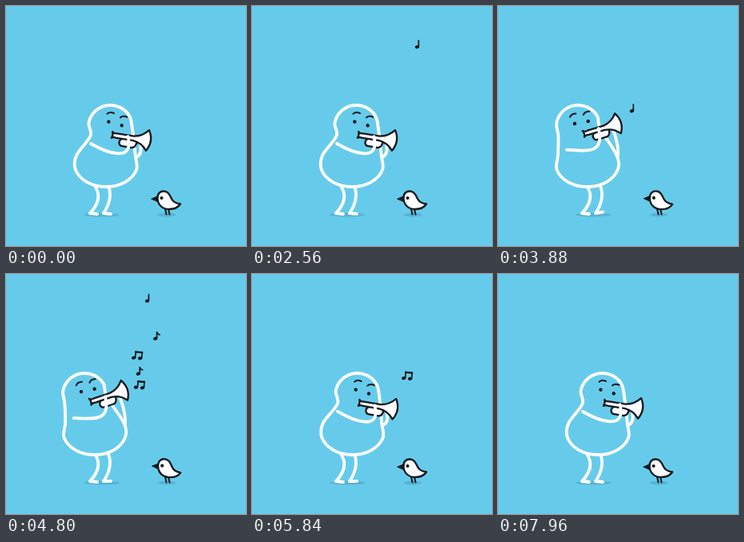
An HTML page with a canvas for the animation above (8 s loop, 300 by 300 pixels).

```html
<!DOCTYPE html>
<html lang="en">
<head>
<meta charset="utf-8">
<title>Trumpet player and bird</title>
<style>
  html, body { margin: 0; width: 100%; height: 100%; overflow: hidden; background: #66cbeb; }
  canvas { display: block; width: 300px; height: 300px; }
</style>
</head>
<body>
<canvas id="stage"></canvas>
<script>
const LOOP = 8000, SKY = '#66cbeb', SHADE = '#58b3d3', INK = '#16181c', WHITE = '#fff';
const RAD = Math.PI / 180;
const canvas = document.getElementById('stage');
const ctx = canvas.getContext('2d');
const ratio = window.devicePixelRatio || 1;
canvas.width = canvas.height = 300 * ratio;

const phrases = [
  { start: 1600, end: 2720, count: 1, first: 0, x: 190, y: 150, drift: 18, spread: 0 },
  { start: 3760, end: 5400, count: 5, first: 0, x: 167, y: 141, drift: 10, spread: 26 },
  { start: 5630, end: 6260, count: 1, first: 2, x: 191, y: 150, drift: 18, spread: 0 }
];

const mix = (a, b, u) => a + (b - a) * u;
const wave = (t, period) => Math.sin(Math.PI * t / period) ** 2;
const hump = (t, from, to) => t > from && t < to ? wave(t - from, to - from) : 0;

function ramp(t, from, to) {
  const u = Math.min(1, Math.max(0, (t - from) / (to - from)));
  return u * u * (3 - 2 * u);
}

// 0 is upright, 1 is leaning back.
function leanAt(t) {
  return .96 * ramp(t, 3480, 3880) + .06 * ramp(t, 3880, 4800)
    - 1.06 * ramp(t, 4900, 5400) + .04 * ramp(t, 5900, 6280) - .06 * hump(t, 2960, 3560);
}

function stroke(path, color, width) {
  ctx.strokeStyle = color;
  ctx.lineWidth = width;
  ctx.stroke(path);
}

function curve(color, width, x, y, ...rest) {
  const path = new Path2D();
  path.moveTo(x, y);
  if (rest.length === 2) path.lineTo(...rest);
  else if (rest.length === 4) path.quadraticCurveTo(...rest);
  else path.bezierCurveTo(...rest);
  stroke(path, color, width);
}

function oval(x, y, rx, ry, color, turn = 0) {
  ctx.beginPath();
  ctx.ellipse(x, y, rx, ry, turn, 0, Math.PI * 2);
  ctx.fillStyle = color;
  ctx.fill();
}

function at(x, y, degrees, draw) {
  ctx.save();
  ctx.translate(x, y);
  ctx.rotate(degrees * RAD);
  draw();
  ctx.restore();
}

// Moves a point out of a turned frame { x, y, turn }.
function place(frame, x, y) {
  const c = Math.cos(frame.turn * RAD), s = Math.sin(frame.turn * RAD);
  return [frame.x + x * c - y * s, frame.y + x * s + y * c];
}

function outlined(path, width) {
  ctx.fillStyle = WHITE;
  ctx.fill(path);
  stroke(path, INK, width);
}

function arc(cx, cy, rx, ry, from, to, steps) {
  return Array.from({ length: steps + 1 }, (_, i) => {
    const a = mix(from, to, i / steps) * RAD;
    return [cx + rx * Math.cos(a), cy + ry * Math.sin(a)];
  });
}

// Smooth closed curve through the points.
function blob(points) {
  const path = new Path2D(), n = points.length;
  path.moveTo(...points[0]);
  points.forEach((p, i) => {
    const before = points[(i + n - 1) % n], next = points[(i + 1) % n], after = points[(i + 2) % n];
    path.bezierCurveTo(
      p[0] + (next[0] - before[0]) / 6, p[1] + (next[1] - before[1]) / 6,
      next[0] - (after[0] - p[0]) / 6, next[1] - (after[1] - p[1]) / 6, ...next);
  });
  return path;
}

const hornLoop = new Path2D('M13 3 Q9 6 11 10 Q12 12 15 12 H27 Q32 11 32 4');
const hornTube = new Path2D('M0 -4 Q2 -1.5 6 -2.5 H27 Q38 -4 45 -13 Q53 0 45 13 Q38 4 27 3 H6 Q2 2 0 4 Q2 0 0 -4 Z');
const birdBody = new Path2D('M189.5 241 C189 234 193 231.5 197 231.5 C203 231.5 205 237 207 241 C209 245 213 247 218 247.5 C215 252 210 254 204 254 C196 254 190 249 189.5 241 Z');
const birdBeak = new Path2D('M182 241 L189 238 V244 Z');

function drawHorn(horn) {
  at(horn.x, horn.y, horn.turn, () => {
    outlined(hornLoop, 2.3);
    outlined(hornTube, 2.3);
  });
}

function drawLeg(hip, bow, heel, lift) {
  curve(WHITE, 3.8, hip, 225, hip + bow, 241, heel, 259);
  at(heel, 259, -15 * lift, () => curve(WHITE, 3.8, 0, 0, 9, 1));
}

function drawFace(face, brow, blink) {
  at(face.x, face.y, face.turn, () => {
    for (const side of [-8.5, 8.5]) {
      oval(side, 0, 2.2, 2.2 - 1.6 * blink, INK);
      curve(INK, 2, side - 4.5, -9 - brow, side - 2, -13 - brow, side + 3.5, -12 - brow);
    }
  });
}

function drawPlayer(t) {
  const lean = leanAt(t);
  const tap = t < 2600 || (t > 3120 && t < 7280) ? wave(t, 520) : 0;
  const playing = t < 2720 || (t > 2960 && t < 7120);
  const press = playing ? wave(t, 260) : hump(t, 7780, 7960);
  const blink = Math.max(hump(t, 240, 480), hump(t, 7240, 7480));

  const face = { x: mix(136.5, 103, lean), y: mix(147, 145.5, lean), turn: mix(16, -11, lean) };
  const [hornX, hornY] = place(face, 0, 14.5);
  const horn = { x: hornX, y: hornY, turn: face.turn - 7 };
  const bellyX = mix(125, 111, lean);

  drawLeg(111, 11, 105, 0);
  drawLeg(128, 6, 122, tap);

  const body = blob([
    ...arc(mix(130.5, 99, lean), 151, 27.5, 27, 155, 365, 6),
    ...arc(bellyX, 197, 39.5, 29, -22, 202, 6)
  ]);
  ctx.fillStyle = SKY;
  ctx.fill(body);
  stroke(body, WHITE, 3.8);
  drawFace(face, 3 * hump(t, 1080, 1660), blink);

  const [gripX, gripY] = place(horn, 37, 7);
  const sideX = bellyX + 38;
  curve(WHITE, 3.8, sideX, 189, (sideX + gripX) / 2 + 5, (189 + gripY) / 2 + 4, gripX, gripY);
  drawHorn(horn);

  const shoulderX = mix(106, 85, lean), shoulderY = mix(172, 180, lean);
  const swing = mix(30, 2, lean) * RAD;
  const [handX, handY] = place(horn, 20, -1);
  curve(WHITE, 3.8, shoulderX, shoulderY,
    shoulderX + 24 * Math.cos(swing), shoulderY + 24 * Math.sin(swing),
    handX + 8, handY + 33, handX, handY + press);
}

function drawBird(t) {
  const bob = t > 3800 && t < 5440 ? wave(t - 3800, 410) : 0;
  const step = hump(t, 240, 760);
  curve(INK, 2, 199, 254, 200.5, 260.5);
  curve(INK, 2, 203, 254, 204.5, 260.5 - step);
  at(202, 253, 3 * bob, () => {
    ctx.translate(-202, -253);
    ctx.fillStyle = INK;
    ctx.fill(birdBeak);
    stroke(birdBeak, INK, 1);
    outlined(birdBody, 2.3);
    oval(194.5, 240, 2.1, 2.1 - 1.5 * hump(t, 1200, 1400), INK);
  });
}

// Kinds: 0 plain, 1 flagged, 2 paired.
function drawNote(x, y, kind) {
  at(x, y, kind === 2 ? 5 : 0, () => {
    for (const head of kind === 2 ? [-4, 4] : [0]) {
      oval(head - 1, 3, 2.6, 2.1, INK, -.3);
      curve(INK, 1.7, head + 1, 3, head + 1, -5);
    }
    if (kind === 1) curve(INK, 1.7, 1, -5, 2, -2, 4.5, -2);
    if (kind === 2) curve(INK, 2.4, -3, -4.5, 5, -4.5);
  });
}

function drawPhrase(t, { start, end, count, first, x, y, drift, spread }) {
  for (let i = 0; i < count; i++) {
    const age = t - start - 445 * i ** .6;
    const height = y - .106 * age;
    if (age < 0 || t >= end || height < 13) continue;
    const order = first + i;
    const speed = drift + spread * Math.sin(1.9 * order);
    drawNote(x + speed * age / 1000, height, order && 2 - order % 2);
  }
}

function draw(t) {
  ctx.setTransform(ratio, 0, 0, ratio, 0, 0);
  ctx.lineCap = ctx.lineJoin = 'round';
  ctx.fillStyle = SKY;
  ctx.fillRect(0, 0, 300, 300);
  oval(119.5, 261, 22.5, 2.5, SHADE);
  oval(201, 261, 11, 2.5, SHADE);
  drawPlayer(t);
  drawBird(t);
  for (const phrase of phrases) drawPhrase(t, phrase);
}

function frame() {
  draw(performance.now() % LOOP);
  requestAnimationFrame(frame);
}
frame();
</script>
</body>
</html>
```
